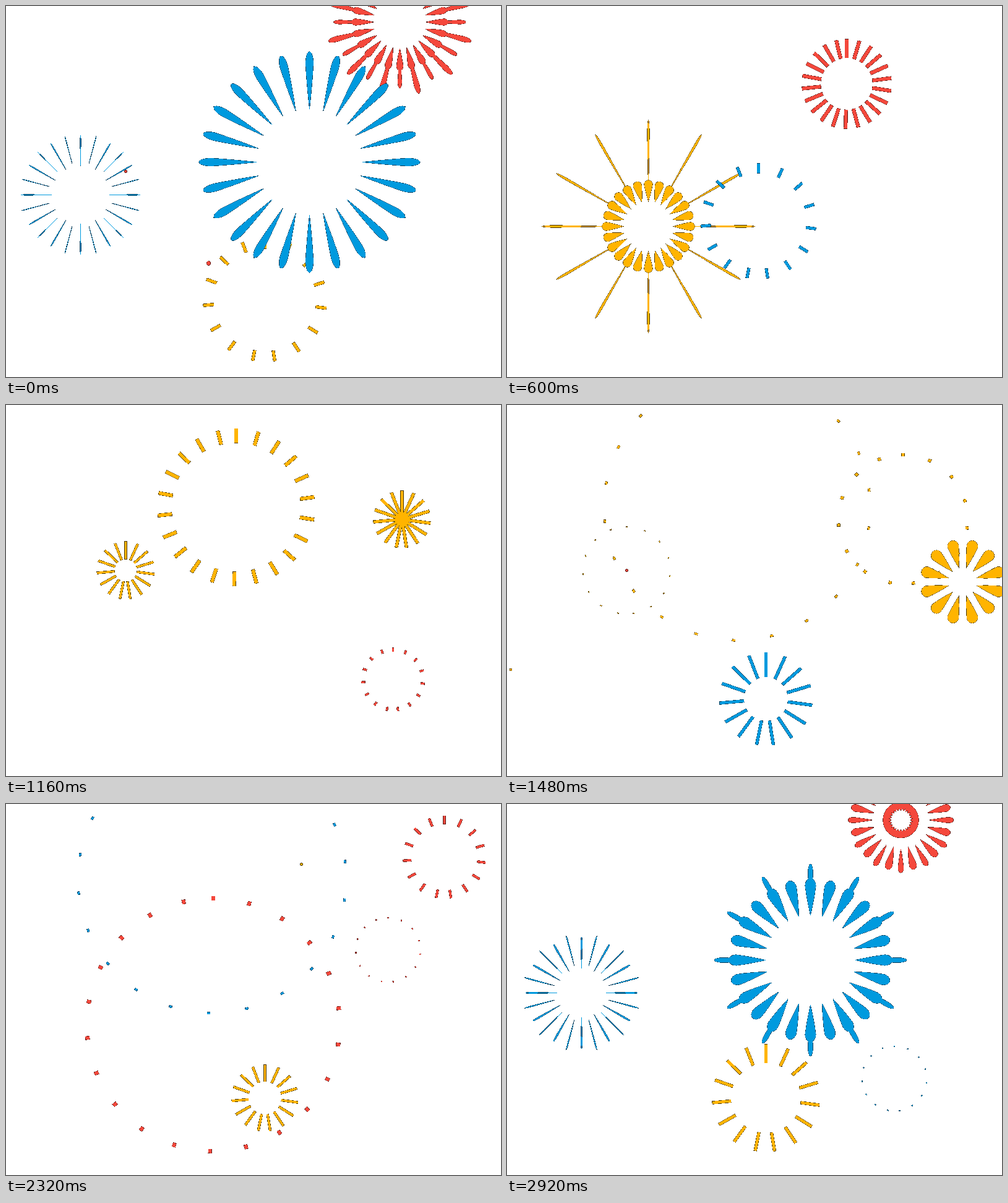
An HTML page that plays this animation: 800 by 600 pixels, repeating every 2.96 s.

```html
<!DOCTYPE html>
<html lang="en">
<head>
<meta charset="utf-8">
<title>Fireworks</title>
<style>
  html, body { margin: 0; width: 100%; height: 100%; overflow: hidden; background: #fff; }
  svg { display: block; width: 800px; height: 600px; }
  path { paint-order: stroke; stroke-width: 1; shape-rendering: crispEdges; }
</style>
</head>
<body>
<svg id="stage" viewBox="0 0 800 600">
  <path id="yellow" fill="#ffb400" stroke="#4a3600"/>
  <path id="red" fill="#f4483c" stroke="#5e1c18"/>
  <path id="blue" fill="#009ade" stroke="#0b3f5c"/>
</svg>
<script>
const LOOP = 2960, STEP = 40;
const CYCLE = LOOP + STEP; // the motion skips one step at the seam

const layers = ['yellow', 'red', 'blue'].map(id => document.getElementById(id));
const bursts = [];

const clamp = v => Math.min(1, Math.max(0, v));
const easeOut = (x, power) => 1 - Math.pow(1 - clamp(x), power);
const fan = (count, spacing, offset = 0) => Array.from({ length: count }, (_, k) => offset + k * spacing);

// Maps (distance, sideways shift) along a ray to stage coordinates.
function ray({ x, y }, deg) {
  const a = deg * Math.PI / 180, sin = Math.sin(a), cos = Math.cos(a);
  return (r, s) => `${(x + r * sin + s * cos).toFixed(2)} ${(y - r * cos + s * sin).toFixed(2)}`;
}

function bar(burst, deg, { tail, head, width }) {
  const p = ray(burst, deg), s = width / 2;
  return `M${p(tail, -s)}L${p(head, -s)}L${p(head, s)}L${p(tail, s)}Z`;
}

// A teardrop stretched to the given length and width.
function drop(burst, deg, { tail, head, width }) {
  const p = ray(burst, deg), s = width / 2, cap = (head - tail) * 0.2;
  const neck = head - cap, mid = tail + (neck - tail) * 0.6;
  return `M${p(tail, 0)}Q${p(mid, -s * .75)} ${p(neck, -s)}` +
    `A${s.toFixed(2)} ${cap.toFixed(2)} ${deg} 0 1 ${p(neck, s)}Q${p(mid, s * .75)} ${p(tail, 0)}Z`;
}

// The tail follows the head's path after a short delay.
function trail(age, size, width, { life, power, delay, gap }) {
  const head = Math.max(size * easeOut(age / life, power), width * .35);
  const tail = Math.max(0, Math.min(size * easeOut((age - delay) / life, power), head - gap));
  return { tail, head, width };
}

const STICK = { life: 12, power: 3.1, delay: 2.4, gap: 1 };
const DOT = { life: 15, power: 2.8, delay: .9, gap: 3 };
const DROP_LIFE = 15.5;

const stickAngles = [...fan(8, 24.4), ...fan(7, 24.5, 191.5)];
const dotAngles = fan(22, 16.5);

function sticks(color, x, y, start, size) {
  const width = 1.2 + size * .03;
  bursts.push({ color, x, y, start, life: STICK.life, angles: stickAngles, shape: bar,
    span: age => trail(age, size, age > 10 ? width / 2 : width, STICK) });
}

function dots(color, x, y, start) {
  bursts.push({ color, x, y, start, life: DOT.life, angles: dotAngles, shape: bar,
    span: age => trail(age, 219, 5.3 - Math.max(0, age - 9) * .2, DOT) });
}

function drops(color, x, y, start, size, hole, width, angles) {
  bursts.push({ color, x, y, start, life: DROP_LIFE, angles, shape: drop,
    span(age) {
      const u = age / 16, head = size * easeOut(u, 2.5);
      const tail = Math.min(head * .55, hole * (1 + 1.6 * u * u));
      return { tail, head, width: width * Math.pow(1 - u, 1.7) };
    } });
}

const allRays = fan(24, 15), evenRays = fan(12, 30), oddRays = fan(12, 30, 15);
const [YELLOW, RED, BLUE] = layers.keys();

sticks(RED, 193.5, 267.5, 0, 71);
sticks(YELLOW, 193.5, 267.5, 1020, 71);
sticks(RED, 193.5, 267.5, 1480, 71);
sticks(BLUE, 418.5, 475.5, 1325, 107);
sticks(YELLOW, 418.5, 475.5, 2160, 75);
sticks(YELLOW, 418.5, 475.5, 2720, 107);
sticks(RED, 625.5, 444, 840, 53);
sticks(YELLOW, 625.5, 444, 1640, 53);
sticks(BLUE, 626, 444, 2480, 53);
sticks(BLUE, 406.5, 348, 320, 100);
sticks(YELLOW, 640, 185, 1080, 107);
sticks(YELLOW, 6, 428, 1480, 52);
sticks(RED, 708.5, 86, 2056, 73);
sticks(RED, 617.5, 236, 1900, 53);
sticks(YELLOW, 477.5, 97.5, 2320, 71);

dots(RED, 327.5, 416, 0);
dots(RED, 549, 126, 520);
dots(YELLOW, 372, 165.5, 1000);
dots(BLUE, 408, 185.5, 1588);
dots(BLUE, 333, 121.5, 1800);
dots(RED, 335, 357, 1929);

drops(BLUE, 120.5, 305.5, 2530, 100, 25, 12, evenRays);
drops(BLUE, 120.5, 305.5, 2470, 101, 25, 11, oddRays);
drops(RED, 636.5, 26, 2720, 140, 42, 17, evenRays);
drops(RED, 636.5, 26, 2788, 188, 42, 17, oddRays);
drops(RED, 636.5, 26, 2880, 193, 46, 15, allRays);
drops(BLUE, 490.5, 252.5, 2760, 258, 70, 28, allRays);
drops(BLUE, 490.5, 252.5, 2648, 207, 65, 20, evenRays);
drops(YELLOW, 228.5, 356.5, 212, 190, 39, 16, evenRays);
drops(YELLOW, 228.5, 356.5, 484, 190, 55, 19, allRays);
drops(YELLOW, 736.5, 286, 1364, 175, 23, 25, oddRays);

function draw(t) {
  const outlines = layers.map(() => '');
  for (const b of bursts) {
    const age = (t >= b.start ? t - b.start : t - b.start + CYCLE) / STEP;
    if (age >= b.life) continue;
    const span = b.span(age);
    outlines[b.color] += b.angles.map(deg => b.shape(b, deg, span)).join('');
  }
  layers.forEach((layer, i) => layer.setAttribute('d', outlines[i]));
}

let begin = null;
function tick(now) {
  if (begin === null) begin = now;
  draw(Math.floor((now - begin) % LOOP / STEP) * STEP);
  requestAnimationFrame(tick);
}
draw(0);
requestAnimationFrame(tick);
</script>
</body>
</html>
```
